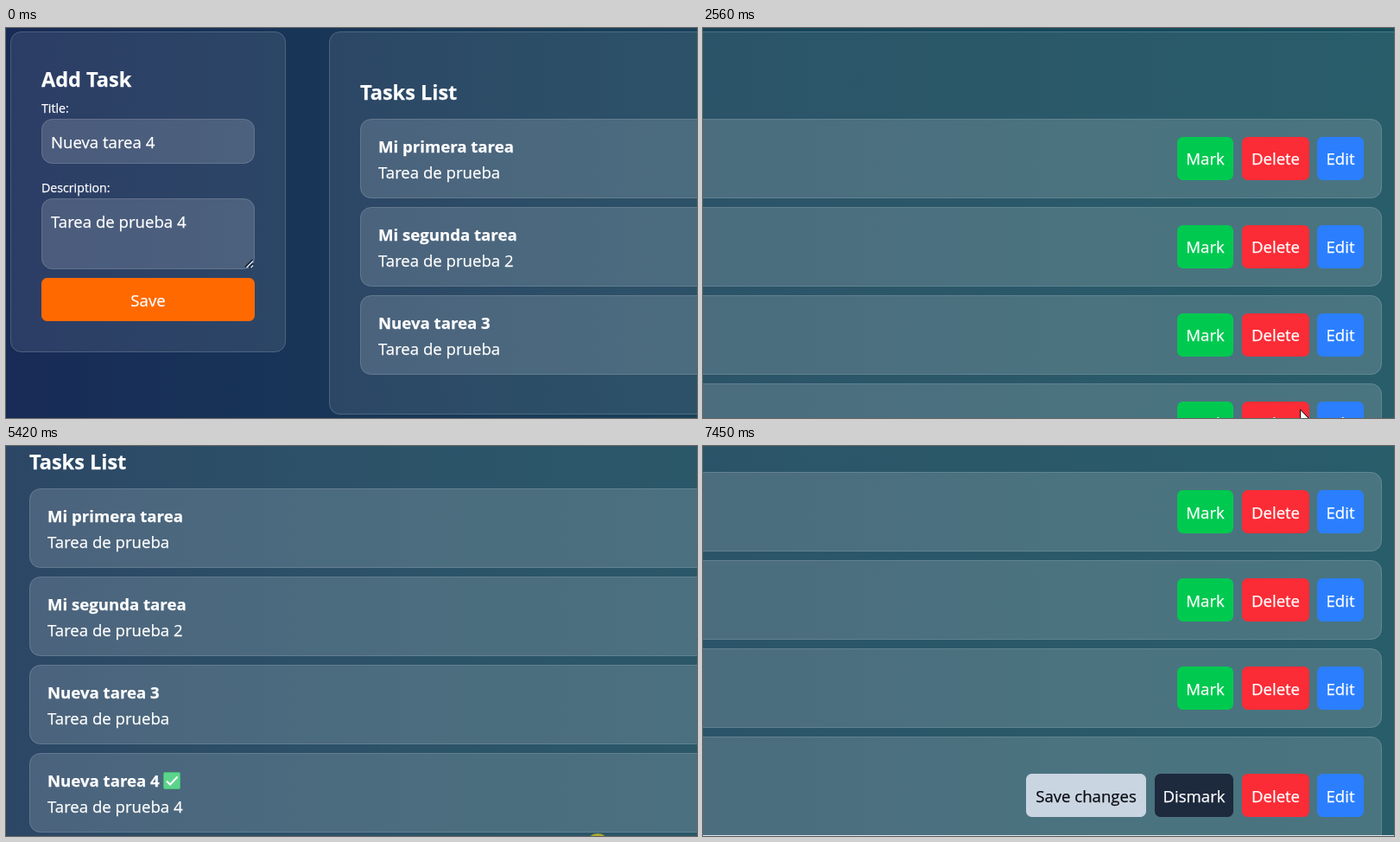
An HTML page that plays this animation: 800 by 451 pixels, repeating every 8 s.

```html
<!DOCTYPE html>
<html lang="es">
<head>
<meta charset="utf-8">
<title>Tasks</title>
<style>
html, body { margin: 0; width: 100%; height: 100%; overflow: hidden; background: #17365a; }
svg { display: block; width: 100%; height: 100%; }
text {
  font-family: "Open Sans", "Noto Sans", sans-serif; font-size: 18.6px; white-space: pre;
  color: #fff; fill: currentColor; stroke: currentColor; stroke-width: .25px;
}
.bold { font-weight: 700; }
.head { font-weight: 700; font-size: 23.5px; }
.label { font-size: 14.2px; }
.mid { text-anchor: middle; }
.dark { color: #0b0d12; }
.panel { fill: rgba(255,255,255,.085); stroke: rgba(255,255,255,.2); }
.card { fill: rgba(255,255,255,.15); stroke: rgba(255,255,255,.2); }
</style>
</head>
<body>
<svg id="stage" viewBox="0 0 800 451" preserveAspectRatio="none">
  <defs>
    <linearGradient id="sky" gradientUnits="userSpaceOnUse" x1="0" x2="1700">
      <stop offset="0" stop-color="#182b56"/>
      <stop offset=".5" stop-color="#18435a"/>
      <stop offset="1" stop-color="#154e5c"/>
    </linearGradient>
  </defs>
</svg>
<script>
const LOOP = 8000;
const RIGHT = 900;   // scroll that shows the action buttons
const ROW = 102;     // distance between cards
const GROWTH = 44;   // extra card height while editing

const stage = document.getElementById('stage');

function add(parent, tag, attrs = {}, content) {
  const node = document.createElementNS('http://www.w3.org/2000/svg', tag);
  for (const key in attrs) node.setAttribute(key, attrs[key]);
  if (content) node.textContent = content;
  return parent.appendChild(node);
}
const label = (parent, x, y, content, cls = '') => add(parent, 'text', { x, y, class: cls }, content);
const box = (parent, cls, x, y, width, height) =>
  add(parent, 'rect', { class: cls, x: x + .5, y: y + .5, width: width - 1, height: height - 1, rx: 12 });
const move = (node, x, y) => node.setAttribute('transform', `translate(${x} ${y})`);
const show = (node, on) => node.setAttribute('visibility', on ? 'visible' : 'hidden');

// A button whose hover colour lies as a second face over the plain one.
function button(parent, x, y, width, content, color, hoverColor = color, cls = '') {
  const group = add(parent, 'g');
  const face = fill => add(group, 'rect', { x, y, width, height: 50, rx: 6.5, fill });
  face(color);
  group.hover = face(hoverColor);
  group.hover.setAttribute('opacity', 0);
  label(group, x + width / 2, y + 32.5, content, 'mid ' + cls);
  return group;
}

// Page
const page = add(stage, 'g');
add(page, 'rect', { width: 1800, height: 1400, fill: 'url(#sky)' });

box(page, 'panel', 5, 4, 319, 371);
label(page, 41, 68, 'Add Task', 'head');
label(page, 41, 98, 'Title:', 'label');
box(page, 'card', 41, 105, 247, 52);
label(page, 52, 139, 'Nueva tarea 4');
label(page, 41, 190, 'Description:', 'label');
box(page, 'card', 41, 197, 247, 82);
label(page, 52, 231, 'Tarea de prueba 4');
add(page, 'path', { d: 'M277 276.5l8.5-8.5M281.5 277l4.5-4.5', stroke: '#17263c', 'stroke-width': 2 });
add(page, 'path', { d: 'M278.5 277l7.5-7.5M283.5 277l2.5-2.5', stroke: '#e6ebf2', 'stroke-width': 1.2 });
const save = button(page, 41, 289, 247, 'Save', '#ff6900', '#ff8904');

const list = box(page, 'panel', 374, 4, RIGHT + 448, 443);
label(page, 410, 83, 'Tasks List', 'head');

const tasks = [
  ['Mi primera tarea', 'Tarea de prueba'],
  ['Mi segunda tarea', 'Tarea de prueba 2'],
  ['Nueva tarea 3', 'Tarea de prueba'],
  ['Nueva tarea 4', 'Tarea de prueba 4']
].map(([title, detail], i) => {
  const group = add(page, 'g');
  move(group, 0, 105 + ROW * i);
  const card = box(group, 'card', 410, 0, RIGHT + 376, 92);
  label(group, 431, 39, title, 'bold');
  label(group, 431, 69, detail);
  const actions = add(group, 'g');
  const mark = button(actions, RIGHT + 549, 21, 65, 'Mark', '#00c950', '#05df72');
  button(actions, RIGHT + 624, 21, 78, 'Delete', '#fb2c36');
  const edit = button(actions, RIGHT + 711, 21, 54, 'Edit', '#2b7fff', '#51a2ff');
  return { group, card, actions, mark, edit };
});

const last = tasks[3];
const dismark = button(last.actions, RIGHT + 523, 21, 91, 'Dismark', '#1d293d', '#314158');
const saveChanges = button(last.actions, RIGHT + 374, 21, 139, 'Save changes', '#cad5e2', '#cad5e2', 'dark');
const check = add(last.group, 'g');
add(check, 'rect', { x: 565.5, y: 22.5, width: 19, height: 19, rx: 1.5, fill: '#5bd48b', stroke: '#45b877' });
add(check, 'path', { d: 'M569 32.5l4 4 8.5-9', fill: 'none', stroke: '#fff', 'stroke-width': 2 });

// Overlay
const edge = add(stage, 'rect', { y: 450, width: 800, height: 1, fill: '#dfe6ea' });
const glow = add(stage, 'circle', { cx: 685, cy: 462, r: 14, fill: 'rgba(225,205,15,.7)' });
const cursor = add(stage, 'path', {
  d: 'M0 0V16L3.7 12.6 6.3 18.6 8.7 17.6 6.2 11.7H11.2Z', fill: '#fff', stroke: '#000'
});

// Each visit of the cursor: glide in, rest on a button, glide out below the stage.
const visits = [
  { targets: [save], enter: 190, rest: 620, leave: 1060, gone: 1570,
    from: [455, 399], spot: [267, 326], to: [687, 455] },
  { targets: [last.mark, dismark], enter: 2500, rest: 2780, leave: 2960, gone: 3430,
    from: [720, 455], spot: [590, 392], to: [613, 455] },
  { targets: [last.edit], enter: 5740, rest: 6090, leave: 6900, gone: 7440,
    from: [690, 455], spot: [725, 388], to: [703, 455] }
];

const ramp = (t, start, end) => Math.min(1, Math.max(0, (t - start) / (end - start)));
const smooth = (t, start, end) => { const p = ramp(t, start, end); return p * p * (3 - 2 * p); };
const between = (t, start, end) => t >= start && t < end;

function scrollAt(t) {
  if (t < 4300) return [RIGHT * smooth(t, 2090, 2480), 66 * smooth(t, 2560, 2780)];
  if (t < 5550) return [383, 56];
  return [RIGHT, t < 6180 ? 56 + 514 * smooth(t, 5750, 6090) : 75];
}

function drawVisit({ targets, enter, rest, leave, gone, from, spot, to }, t) {
  const hover = ramp(t, rest - 100, rest) - ramp(t, leave + 60, leave + 210);
  for (const target of targets) target.hover.setAttribute('opacity', hover);
  if (!between(t, enter, gone)) return false;
  const arrived = ramp(t, enter, rest), left = ramp(t, leave, gone);
  move(cursor, ...spot.map((v, k) => v + (from[k] - v) * (1 - arrived) + (to[k] - v) * left));
  return true;
}

function draw(t) {
  const [x, y] = scrollAt(t);
  move(page, -x, -y);
  show(cursor, visits.map(visit => drawVisit(visit, t)).some(Boolean));

  const added = t >= 1020, marked = t >= 3000, editing = t >= 6500;
  const growth = editing ? GROWTH : 0;
  list.setAttribute('height', 442 + (added ? ROW : 0) + growth);
  last.card.setAttribute('height', 91 + growth);
  move(last.actions, 0, growth / 2);
  last.group.setAttribute('display', added ? 'inline' : 'none');
  show(last.mark, !marked);
  show(dismark, marked);
  show(check, marked);
  show(saveChanges, editing);
  show(glow, between(t, 2030, 2160) || between(t, 5420, 5550));
  show(edge, t >= 5550);
}

const begin = performance.now();
function tick() {
  draw((performance.now() - begin) % LOOP);
  requestAnimationFrame(tick);
}
tick();
</script>
</body>
</html>
```
